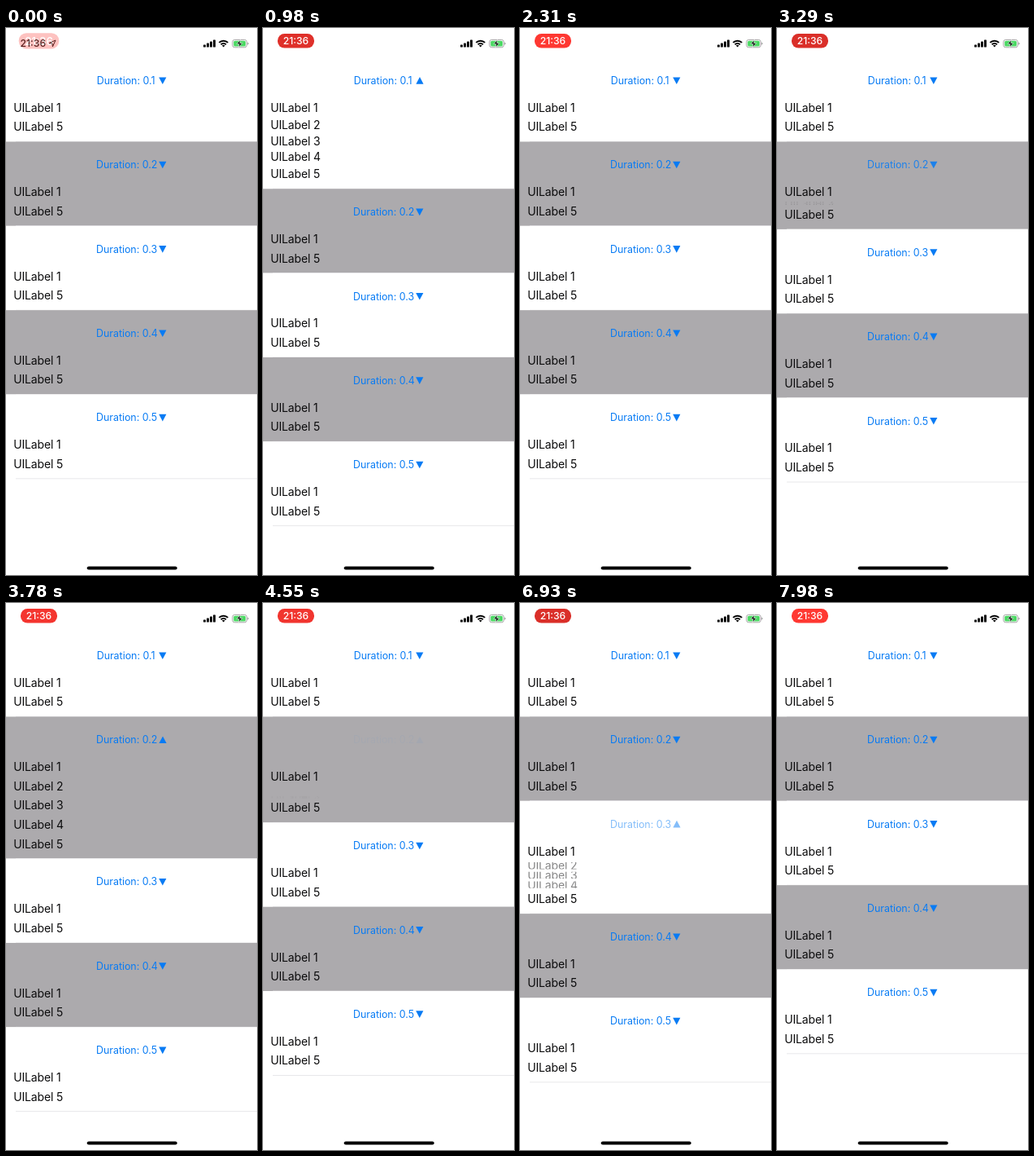
Recreate the animation shown at these times as an HTML page. Size 309x671 px, loop 8 s.

```html
<!DOCTYPE html>
<html lang="en">
<head>
<meta charset="utf-8">
<title>Expanding cells</title>
<style>
  html, body { margin: 0; width: 100%; height: 100%; overflow: hidden; background: #fff; }
  #stage { display: block; width: 100vw; height: 100vh; }
  text { font-family: Inter, Roboto, sans-serif; }
  .label { font-size: 14px; letter-spacing: -.15px; fill: #0c0c0d; }
  .title { font-size: 12.4px; fill: #087bf4; }
  .clock { font-size: 12.2px; font-weight: 500; }
</style>
</head>
<body>
<svg id="stage" viewBox="0 0 309 671">
  <rect width="309" height="671" fill="#fff"/>
  <g id="cells"></g>

  <g id="idle" fill="#111">
    <text class="clock" x="17.5" y="23">21:36</text>
    <path d="M53 18.6 61 15 57.4 23 57 19Z" fill="none" stroke="#111" stroke-linejoin="round"/>
  </g>
  <g id="pill">
    <rect id="pillBg" x="18" y="7" width="45" height="17.6" rx="8.4"/>
    <text class="clock" x="40.5" y="20.2" text-anchor="middle" fill="#fff">21:36</text>
  </g>

  <g id="signal"></g>
  <g fill="none" stroke="#000" stroke-width="2">
    <path d="M262.3 17.9a7.7 7.7 0 0 1 10.9 0"/>
    <path d="M264.6 20.2a4.5 4.5 0 0 1 6.3 0"/>
  </g>
  <path d="M265.9 21.5a2.7 2.7 0 0 1 3.7 0l-1.85 2Z"/>
  <rect x="278.8" y="14.4" width="17.6" height="9.4" rx="2.7" fill="#fff" stroke="#9b9b9b" stroke-width=".9"/>
  <rect x="280.2" y="15.8" width="14.8" height="6.6" rx="1.5" fill="#4cd964"/>
  <path d="M297.4 17.4v3.4q1.4-.5 1.4-1.7t-1.4-1.7Z" fill="#9b9b9b"/>
  <path d="M288.6 14.4 284 19.7h3.1l-.9 4.2 4.7-5.5h-3.1Z" stroke="#fff" stroke-width=".6"/>

  <rect x="99.7" y="660.4" width="111" height="4.2" rx="2.1"/>
</svg>
<script>
const LOOP = 8000;
const TABLE_MS = 300;   // the table animates row heights at its own fixed pace
const TOP = 36.1, ROW = 103.35, PITCH = 23.6, LINE = 16.9;
const LABEL1 = 61.8, LABEL5 = 85.3, BASE = 5;
const TAPS = [[770, 1945], [3240, 4379], [5685, 6780]];   // open, close
const DOWN = 'M188.2 24.3h9.2l-4.6 8.6Z', UP = 'M188.4 32.6h9.2l-4.6-8.6Z';

const $ = id => document.getElementById(id);
const clamp = v => Math.min(1, Math.max(0, v));

function add(parent, tag, attrs, text) {
  const el = document.createElementNS('http://www.w3.org/2000/svg', tag);
  set(el, attrs);
  if (text) el.textContent = text;
  return parent.appendChild(el);
}

function set(el, attrs) {
  for (const k in attrs) el.setAttribute(k, attrs[k]);
}

// cubic-bezier(.42, 0, .58, 1)
function easeInOut(x) {
  if (x <= 0) return 0;
  if (x >= 1) return 1;
  let lo = 0, hi = 1, u = .5;
  for (let i = 0; i < 24; i++) {
    u = (lo + hi) / 2;
    const v = 1 - u;
    if (1.26 * u * v * v + 1.74 * u * u * v + u * u * u < x) lo = u; else hi = u;
  }
  return u * u * (3 - 2 * u);
}

function makeCell(i) {
  const root = add($('cells'), 'g', {});
  const bg = add(root, 'rect', { width: 309, fill: i % 2 ? '#acaaad' : '#fff' });
  const line = add(root, 'rect', { x: 12, width: 297, height: .8, fill: '#e2e2e5' });
  const title = add(root, 'g', { class: 'title' });
  add(title, 'text', { x: i ? 111 : 111.7, y: 32.9 }, `Duration: 0.${i + 1}`);
  const arrow = add(title, 'path', {});
  const label = (parent, n) => add(parent, 'text', { class: 'label', x: 9.2 }, `UILabel ${n}`);
  const first = label(root, 1);
  const hidden = [2, 3, 4].map(n => {
    const box = add(root, 'svg', { width: 309, overflow: 'hidden' });
    return { box, text: label(box, n) };
  });
  const last = label(root, 5);
  return { i, root, bg, line, title, arrow, first, hidden, last };
}

const cells = [0, 1, 2, 3, 4].map(makeCell);

[3.2, 5, 7, 9.2].forEach((h, i) =>
  add($('signal'), 'rect', { x: 243 + i * 4, y: 23.6 - h, width: 2.9, height: h, rx: .7 }));

// Lays out one cell and returns its height.
function drawCell(c, top, t) {
  const [open, close] = TAPS[c.i] || [LOOP, LOOP];
  const dur = 100 * (c.i + 1);
  const phase = ms => easeInOut((t - open) / ms) - easeInOut((t - close) / ms);
  const shown = phase(dur);
  const extra = 3 * PITCH * phase(TABLE_MS);
  const height = ROW + extra;

  // Labels 2-4 take what fits; label 1 stretches over any height left.
  const pitch = Math.min(shown * PITCH, extra / 3);
  const slack = extra - 3 * pitch;
  const h = pitch * LINE / PITCH;

  set(c.root, { transform: `translate(0 ${top})` });
  set(c.bg, { height });
  set(c.line, { y: height - .4 });
  set(c.first, { y: LABEL1 + slack / 2 + BASE });
  set(c.last, { y: LABEL5 + extra + BASE });
  c.hidden.forEach(({ box, text }, k) => {
    const mid = LABEL1 + slack + PITCH / 2 + pitch * (k + .5);
    set(box, { y: mid - h / 2, height: h, opacity: shown, display: h > .01 ? 'inline' : 'none' });
    set(text, { y: h / 2 + BASE });
  });

  // The old title fades out, then the new one appears.
  const up = t >= open + dur && t < close + dur;
  set(c.arrow, { d: up ? UP : DOWN });
  set(c.title, { opacity: up ? shown : 1 - shown });
  return height;
}

function drawPill(t) {
  const fade = clamp(.3 + t / 400);
  const grow = 1 + .14 * (1 - fade);
  const glow = .5 + .5 * Math.cos(Math.PI * (t - 2200) / 970);
  const mix = (a, b) => Math.round(a + (b - a) * glow);
  set($('pillBg'), { fill: `rgb(${mix(217, 255)},${mix(47, 56)},${mix(41, 50)})` });
  set($('pill'), {
    opacity: fade,
    transform: `translate(40.5 15.8) scale(${grow}) translate(-40.5 -15.8)`
  });
  set($('idle'), { opacity: 1 - clamp((fade - .3) / .7) });
}

function render(t) {
  let top = TOP;
  for (const c of cells) top += drawCell(c, top, t);
  drawPill(t);
}

const start = performance.now();
function tick() {
  render((performance.now() - start) % LOOP);
  requestAnimationFrame(tick);
}
tick();
</script>
</body>
</html>
```
